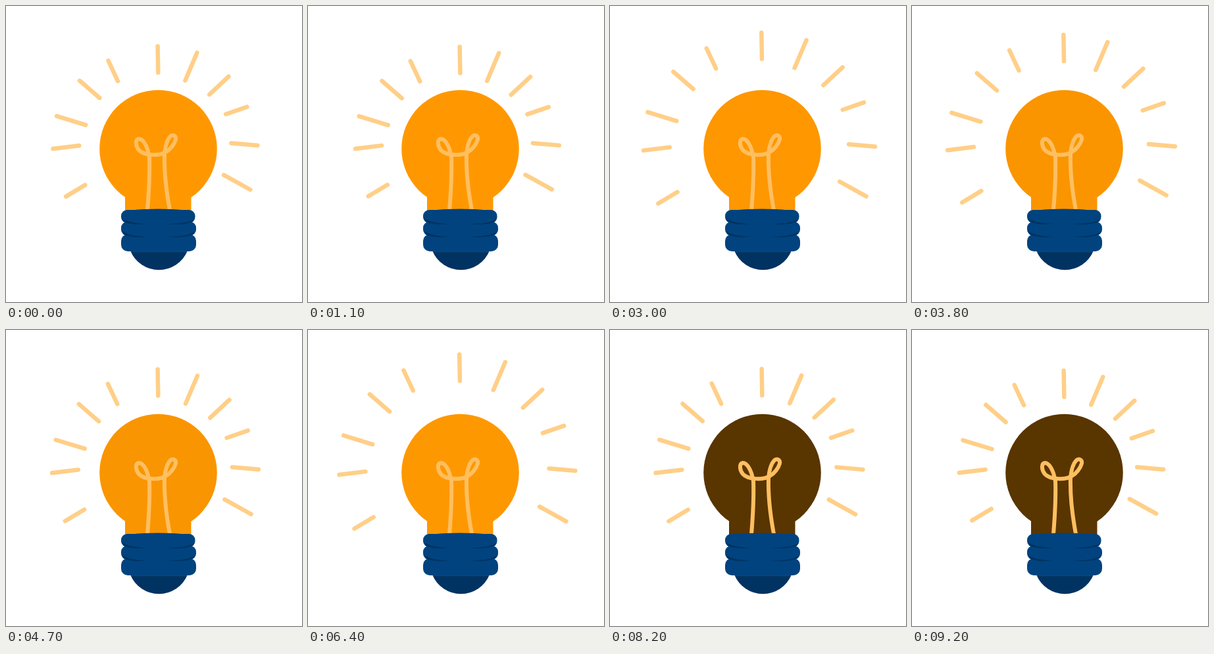
Recreate the animation shown at these times as an HTML page. Size 450 px wide and 450 px high, loop 9300 ms.

```html
<!DOCTYPE html>
<html lang="en">
<head>
<meta charset="utf-8">
<title>Light bulb</title>
<style>
  html, body { margin: 0; width: 100%; height: 100%; overflow: hidden; background: #fff; }
  svg { display: block; width: 100%; height: 100%; }
</style>
</head>
<body>
<svg viewBox="0 0 450 450">
  <g id="rays" stroke="#ffcf88" stroke-width="6.500" stroke-linecap="round"></g>
  <g id="glass">
    <circle cx="231.500" cy="217" r="89.300"/>
    <path d="M181 270H281.500V318H181Z"/>
  </g>
  <path fill="none" stroke="#ffbf60" stroke-width="6"
    d="M215 310Q219 262 218 230C215 212 208 202 202 202C196 203 197 213 202 219
       C210 228 234 228 243 222C250 218 256 210 258 203C259 197 254 195 250 198
       C244 204 242 214 241 225Q240 262 249 310"/>
  <path fill="#003362" d="M189 372A47 47 0 0 0 276 372Z"/>
  <g fill="#00437f">
    <path d="M180 315Q181 308.500 231 308.500T283 315Z"/>
    <rect x="175" y="310" width="112.500" height="20" rx="9"/>
    <rect x="175" y="328" width="114" height="21" rx="9"/>
    <rect x="175" y="347" width="114" height="26" rx="10"/>
  </g>
  <g fill="#003362">
    <path id="folds" d="M176 322Q185 330 213 331Q193 334 179 328Z
      M287 323Q278 331 245 331Q268 334 284 328Z"/>
    <use href="#folds" y="19.500"/>
  </g>
  <path d="M190 373.700H275" stroke="#24547f" stroke-width=".7"/>
</svg>
<script>
const LOOP = 9300, PULSE = LOOP / 8, FLICKER = 1050, TRAVEL = 25.5;
const LIT = [255, 152, 0], DARK = [89, 53, 0];

// Hand-drawn spacing of the rays around the bulb, in degrees.
const bearings = [-207, -179, -162, -139, -120, -90, -68, -46, -26, -3, 23];
const radians = degrees => degrees * Math.PI / 180;
const wave = x => Math.sin(Math.PI * x) ** 2;

const rays = bearings.map((bearing, i) => {
  const line = document.createElementNS("http://www.w3.org/2000/svg", "path");
  const length = 34 + 12 * wave(i / 4);
  const radius = 140 - i;
  const x = 231 + radius * Math.cos(radians(bearing));
  const y = 217 + radius * Math.sin(radians(bearing));
  const heading = 24 * (i - 5) - 91;
  line.setAttribute("d", `M${-length / 2} 0h${length}`);
  document.getElementById("rays").append(line);
  return { line, place: `translate(${x} ${y}) rotate(${heading})` };
});
const glass = document.getElementById("glass");

function brightness(t) {
  if (t < 6500) return 1 - 0.035 * wave(t / FLICKER);
  return Math.max(0, 1 - (t - 6500) / 400);
}

function draw(now) {
  const t = now % LOOP;
  const reach = TRAVEL * wave(t / PULSE + 0.05);
  for (const { line, place } of rays)
    line.setAttribute("transform", `${place} translate(${reach} 0)`);
  const light = brightness(t);
  const color = DARK.map((c, i) => Math.round(c + (LIT[i] - c) * light));
  glass.setAttribute("fill", `rgb(${color})`);
}

function tick() {
  draw(performance.now());
  requestAnimationFrame(tick);
}
tick();
</script>
</body>
</html>
```
